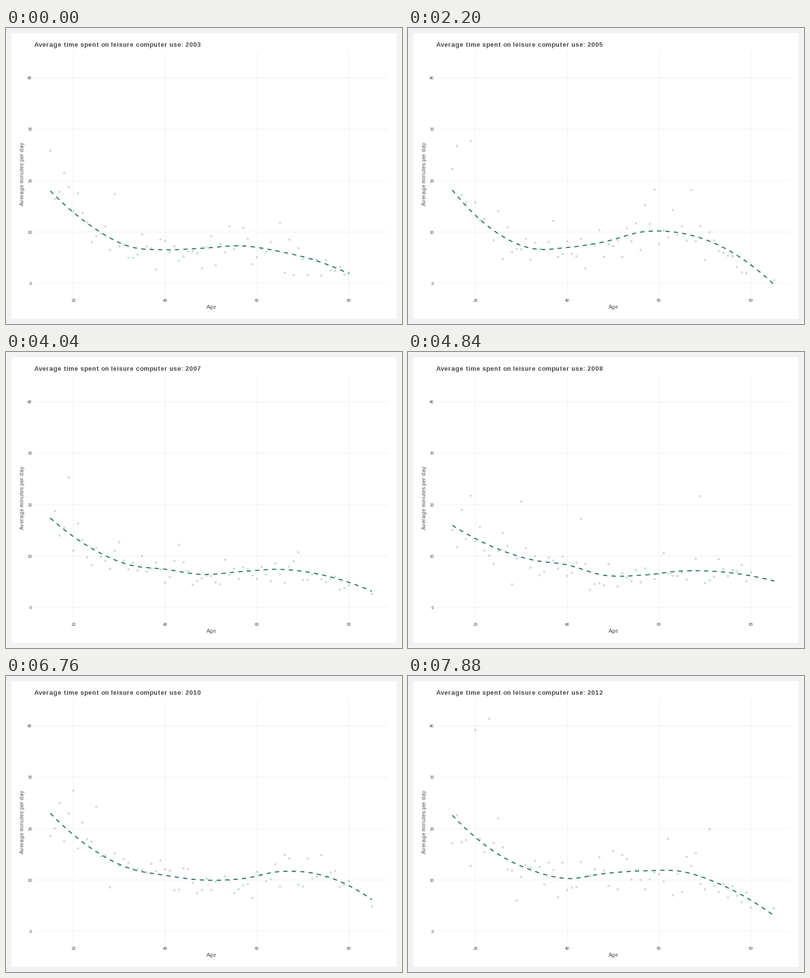
These frames come from a looping animation (800 by 600 pixels, 8000 ms). A matplotlib script:

```python
import numpy as np
import matplotlib.pyplot as plt
from matplotlib.animation import FuncAnimation
from matplotlib.patches import Rectangle

W, H, DPI = 800, 600, 100
PX = 72 / DPI  # points per pixel
GREEN, INK, GRID, FRAME = "#27735a", "#4d4d4d", "#f0f0f0", "#f2f2f2"
STEPS, CYCLE, FRAMES = 11, 22, 200
FIRST, LAST = 2003, 2012

# Unkerned text on whole-pixel advances.
plt.rcParams.update({"font.family": "Liberation Sans",
                     "text.hinting_factor": 1, "text.kerning_factor": 6})

# Trend through a few ages; years left out lie halfway between their neighbours.
KNOTS = np.array([15, 24, 32, 40, 48, 57, 65, 73, 85.0])
TREND = {
    2003: [18.0, 11.1, 7.25, 6.55, 6.85, 7.3, 6.2, 4.4, -0.4],
    2005: [17.95, 10.2, 6.9, 7.1, 8.2, 10.25, 9.9, 7.55, -0.2],
    2006: [20.4, 11.2, 6.55, 5.9, 7.0, 8.6, 8.4, 6.3, 0.2],
    2008: [15.65, 11.65, 9.35, 8.3, 6.1, 6.1, 6.85, 6.7, 4.85],
    2009: [19.25, 12.45, 9.1, 8.1, 7.85, 8.6, 9.5, 9.65, 8.2],
    2010: [23.1, 16.25, 12.45, 11.1, 9.65, 9.85, 11.65, 11.75, 7.1],
    2012: [22.6, 15.6, 12.0, 10.3, 11.25, 11.8, 11.65, 9.3, 3.1],
}
# Ages that stand far off the trend.
PEAKS = {
    2003: {15: 25.8, 29: 17.4},
    2005: {16: 27.9, 19: 27.9, 59: 19.3, 67: 19.2},
    2006: {19: 26.3},
    2007: {19: 26.2},
    2008: {19: 22.8, 30: 21.4, 43: 18.7, 69: 22.1},
    2009: {26: 29.8, 61: 19, 68: 21.4, 78: 22.4},
    2010: {20: 27.5, 25: 25},
    2011: {20: 27.3, 25: 23.3},
    2012: {20: 39.2, 23: 41.35, 71: 19.85},
}


def smooth(vals, x):
    """Cubic Hermite curve through the knots."""
    slope = np.gradient(vals, KNOTS, edge_order=2)
    i = np.clip(np.searchsorted(KNOTS, x) - 1, 0, len(KNOTS) - 2)
    h = KNOTS[i + 1] - KNOTS[i]
    t = (x - KNOTS[i]) / h
    return ((1 + 2 * t) * (1 - t) ** 2 * vals[i] + t * (1 - t) ** 2 * h * slope[i]
            + t * t * (3 - 2 * t) * vals[i + 1] + t * t * (t - 1) * h * slope[i + 1])


def to_px(age, minutes):
    return np.column_stack([89.6 + 9.279 * (age - 15), 517.8 - 10.42 * minutes])


def survey(year):
    """Pixel places of one year's dots and trend line."""
    if year in TREND:
        vals = np.array(TREND[year])
    else:
        vals = np.mean([TREND[year - 1], TREND[year + 1]], axis=0)
    ages = np.arange(15, 81.0)
    if year >= 2005:
        ages = np.append(ages, 85)
    mid = smooth(vals, ages)
    rng = np.random.default_rng(year)
    y = np.maximum(mid - 0.3 + rng.normal(0, 0.8 + 0.17 * np.abs(mid)), 0.6)
    for age, minutes in PEAKS.get(year, {}).items():
        y[age - 15] = minutes
    grid = np.linspace(15, ages[-1], 80)
    return to_px(ages, y), to_px(grid, smooth(vals, grid))


dots, curves = zip(*(survey(y) for y in range(FIRST, LAST + 1)))

fig = plt.figure(figsize=(W / DPI, H / DPI), dpi=DPI, facecolor=FRAME)
ax = fig.add_axes([0, 0, 1, 1])
ax.set(xlim=(0, W), ylim=(H, 0))
ax.axis("off")
ax.add_patch(Rectangle((10.67, 10.67), W - 21.34, H - 21.34,
                       fc="white", ec="none", snap=False))


def label(x, y, s, size, **kw):
    kw = {"ha": "center", "va": "baseline", "color": INK, **kw}
    return ax.text(x, y, s, fontsize=size * PX, **kw)


def rule(xs, ys):
    ax.plot(xs, ys, color=GRID, lw=1.07 * PX, solid_capstyle="butt",
            snap=False, zorder=1.5)


for v in range(0, 41, 10):
    y = to_px(15, v)[0, 1]
    rule([57.1, 772], [y, y])
    label(52.2, y + 3.3, str(v), 9, ha="right")
for a in range(20, 81, 20):
    x = to_px(a, 0)[0, 0]
    rule([x, x], [48.2, 543.4])
    label(x, 555, str(a), 9)

label(414.5, 569, "Age", 11)
label(36, 295.3, "Average minutes per day", 11, rotation=90, rotation_mode="anchor")
title = label(57.2, 38, "", 13, ha="left", weight="bold")

DOT = (3.9 * PX) ** 2
points = ax.scatter([], [], s=[], facecolor=GREEN, edgecolor=GREEN, alpha=0.2,
                    linewidth=0.71 * PX, zorder=2)
line, = ax.plot([], [], color=GREEN, lw=2.13 * PX, ls=(0, (4, 4)),
                dash_capstyle="butt", zorder=3)


def draw(i):
    s, k = divmod(i + STEPS, CYCLE)
    prev, p = max(s - 1, 0), min(k + 1, STEPS) / STEPS
    if p == 1:
        pos = dots[s]
    else:  # an age new to the survey waits until the move is over
        n = min(len(dots[prev]), len(dots[s]))
        pos = (1 - p) * dots[prev][:n] + p * dots[s][:n]
    path = (1 - p) * curves[prev] + p * curves[s]
    points.set_offsets(pos)
    points.set_sizes(np.full(len(pos), DOT), DPI)
    line.set_data(path.T)
    year = FIRST + (s if p > 0.5 else prev)
    title.set_text(f"Average time spent on leisure computer use: {year}")
    return points, line, title


anim = FuncAnimation(fig, draw, frames=FRAMES, interval=40, repeat=True, repeat_delay=0)
plt.show()
```
